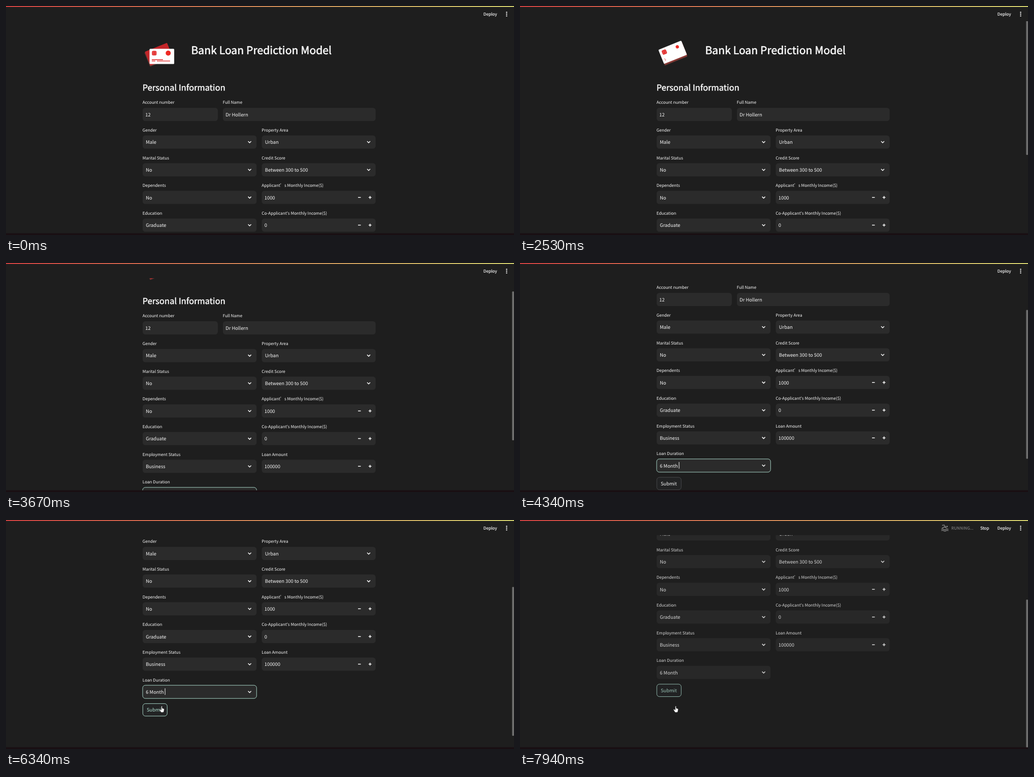
These frames come from a looping animation (1000 px wide and 452 px high, 8 s). An HTML page:

```html
<!DOCTYPE html>
<html lang="en">
<head>
<meta charset="utf-8">
<title>Loan form</title>
<style>
html, body { margin: 0; width: 100%; height: 100%; overflow: hidden; background: #1e1e1e; }
svg { display: block; width: 1000px; height: 452px; }
text {
  font-family: "Noto Sans CJK SC", "Noto Sans CJK JP", "Noto Sans CJK", "Open Sans", sans-serif;
  fill: #fafafa; text-rendering: geometricPrecision; white-space: pre;
}
.label { font-size: 8.18px; }
.value { font-size: 9.34px; }
.h2 { font-size: 21px; letter-spacing: .005em; stroke: #fafafa; stroke-width: .6px; }
.h3 { font-size: 16.35px; letter-spacing: .006em; stroke: #fafafa; stroke-width: .48px; }
.bar { font-size: 8.18px; stroke: #fafafa; stroke-width: .15px; }
.muted { font-size: 8.18px; fill: #8b8b8b; }
.icon { fill: none; stroke: #fafafa; stroke-width: 1.5; }
</style>
</head>
<body>
<svg viewBox="0 0 1000 452">
  <defs>
    <linearGradient id="glow">
      <stop offset="0" stop-color="#ff4b4b"/>
      <stop offset="1" stop-color="#fffd80"/>
    </linearGradient>
  </defs>
  <rect width="1000" height="452" fill="#1e1e1e"/>
  <g id="page">
    <g id="back">
      <rect x="-24.5" y="-14.5" width="48" height="30" rx="1.5" fill="#6e3733"/>
      <rect id="backFace" x="-23" y="-15.5" width="47" height="29.5" rx="1.5"/>
    </g>
    <g id="front">
      <rect x="-24.3" y="-15" width="48.6" height="30" rx="1.5" fill="#fff"/>
      <rect x="-19.5" y="-11" width="9" height="9" rx="2.5" fill="#e02424"/>
      <path d="M-19.5 -8h3m3 0h3M-19.5 -5h3m3 0h3M-16.5 -11v9M-13.5 -11v9" stroke="#f58a86" stroke-width=".6" fill="none"/>
      <circle id="mark" cx="12.5" cy="-6.5" fill="#ee2a24"/>
      <g id="lines" fill="#e02424">
        <rect y="5.6" width="22" height="1.5"/>
        <rect y="8.4" width="7" height="1.3"/>
        <rect x="10" y="8.4" width="26" height="1.3"/>
      </g>
    </g>
    <text class="h2" x="364.4" y="95">Bank Loan Prediction Model</text>
    <text class="h3" x="268.8" y="167">Personal Information</text>
    <g id="form"></g>
    <rect id="button" x="269.3" y="565" width="48" height="24.6" rx="5.2" fill="#222324" stroke-width=".9"/>
    <text id="submit" class="value" x="277" y="581">Submit</text>
    <rect id="caret" x="312.6" y="534.8" width="1" height="13" fill="#fafafa"/>
  </g>
  <rect id="thumb" x="996.3" width="3.7" height="294" rx="1.5" fill="#6d6d6d"/>
  <rect width="1000" height="30" fill="#1e1e1e"/>
  <rect width="1000" height="1.6" fill="url(#glow)"/>
  <g id="running">
    <g fill="none" stroke="#8b8b8b" stroke-width="1.3">
      <path d="M831 10.5l4-.6 3.2 4.2M830.5 16.2l5-2.6 4.2 2.4"/>
      <path d="M829.5 18.6q2.3-1.8 4.6 0t4.6 0 4.6 0M829.5 21.3q2.3-1.8 4.6 0t4.6 0 4.6 0"/>
      <circle cx="840.6" cy="13" r="1.4" fill="#8b8b8b" stroke="none"/>
    </g>
    <text class="muted" x="849" y="18.8">RUNNING...</text>
    <text class="bar" x="906" y="18.8">Stop</text>
  </g>
  <text class="bar" x="939.8" y="18.8">Deploy</text>
  <g fill="#fafafa">
    <circle cx="985.5" cy="12.4" r="1.2"/>
    <circle cx="985.5" cy="16" r="1.2"/>
    <circle cx="985.5" cy="19.6" r="1.2"/>
  </g>
  <rect y="448.6" width="1000" height="3.4" fill="#190f13"/>
  <path id="arrow" d="M0 0v8.6l2-1.8 1.4 3 1.4-.7-1.4-2.9h2.6z" fill="#fff" stroke="#111" stroke-width=".5"/>
  <path id="hand" d="M-.9 .6q.9-1.2 1.8 0v3.6l3.2 .9q.9 .4 .8 1.5l-.7 4.2q-.3 1.6-1.8 1.6h-2.6q-1 0-1.6-1l-2.4-4q-.3-1.3 1-1.1l2.3 1.5z" fill="#fff" stroke="#111" stroke-width=".5"/>
</svg>
<script>
const LOOP = 8000, ROW = 54.65, MINT = '#b4e6d6';
const $ = id => document.getElementById(id);
const el = (name, attrs, text = '') => {
  const node = document.createElementNS('http://www.w3.org/2000/svg', name);
  for (const key in attrs) node.setAttribute(key, attrs[key]);
  node.textContent = text;
  $('form').append(node);
  return node;
};

// row, left, width, kind, label, value
const fields = [
  [0, 269, 148, 'text', 'Account number', '12'],
  [0, 427, 300.6, 'text', 'Full Name', 'Dr Hollern'],
  [1, 269, 224.3, 'select', 'Gender', 'Male'],
  [1, 503.5, 224.1, 'select', 'Property Area', 'Urban'],
  [2, 269, 224.3, 'select', 'Marital Status', 'No'],
  [2, 503.5, 224.1, 'select', 'Credit Score', 'Between 300 to 500'],
  [3, 269, 224.3, 'select', 'Dependents', 'No'],
  [3, 503.5, 224.1, 'number', 'Applicant\u2019s Monthly Income($)', '1000'],
  [4, 269, 224.3, 'select', 'Education', 'Graduate'],
  [4, 503.5, 224.1, 'number', 'Co-Applicant\'s Monthly Income($)', '0'],
  [5, 269, 224.3, 'select', 'Employment Status', 'Business'],
  [5, 503.5, 224.1, 'number', 'Loan Amount', '100000'],
  [6, 269, 224.3, 'select', 'Loan Duration', '6 Month']
];

let lastBox;
for (const [row, x, width, kind, label, value] of fields) {
  const y = row * ROW, mid = 213.9 + y;
  el('text', { class: 'label', x: x - .2, y: 193.3 + y }, label);
  lastBox = el('rect', { x, y: 200.9 + y, width, height: 26, rx: 5.2, fill: '#2b2b2b', 'stroke-width': .9 });
  el('text', { class: 'value', x: x + (kind === 'select' ? 6.3 : 5.3), y: 217.6 + y }, value);
  const right = x + width;
  if (kind === 'select') {
    el('path', { class: 'icon', d: `M${right - 16.7} ${mid - 1.5}l3 3 3-3` });
  } else if (kind === 'number') {
    el('path', { class: 'icon', d: `M${right - 34.6} ${mid}h5.4M${right - 13.8} ${mid}h5.6m-2.8-2.8v5.6` });
  }
}

const smooth = p => p * p * (3 - 2 * p);
// Eased value from rows of [time, value, ...]
const track = (rows, t, col = 1) => {
  const i = rows.findIndex(r => r[0] > t);
  if (i === 0) return rows[0][col];
  if (i < 0) return rows[rows.length - 1][col];
  const a = rows[i - 1], b = rows[i];
  return a[col] + (b[col] - a[col]) * smooth((t - a[0]) / (b[0] - a[0]));
};

const scroll = [[2730, 0], [3670, 85.9], [3980, 85.9], [4340, 142], [4670, 142], [5070, 202.6], [7420, 202.6], [7900, 241]];
const flip = [[1830, 0], [2430, 1], [2640, 1], [3300, 0]];
const mouse = [[100, 12, 330], [890, 600, 150], [1130, 622.5, 126.5], [1270, 622.5, 126.5], [1600, 1004, 439],
  [5200, 1004, 180], [6010, 306, 366], [6340, 306.5, 367.3]];

const place = (id, x, y, turn = 0) => $(id).setAttribute('transform', `translate(${x} ${y}) rotate(${turn})`);
const show = (id, on) => $(id).setAttribute('visibility', on ? 'visible' : 'hidden');

function draw(t) {
  const top = track(scroll, t);
  const focus = t < 6860, over = t >= 5960, busy = t >= 7040;
  place('page', 0, -top);
  $('page').setAttribute('opacity', track([[7040, 1], [7900, .84]], t));
  $('thumb').setAttribute('y', top * .651);
  show('thumb', t >= 300);

  const p = track(flip, t);
  place('back', 300.5 + p * 1.5, 96 - p * 2, -22);
  $('backFace').setAttribute('fill', p > .5 ? '#8d3834' : '#c22529');
  place('front', 306.8 - p * 6.3, 99.5 - p * 8.2, -22 * p);
  $('mark').setAttribute('r', 5 - p * 1.8);
  $('lines').setAttribute('transform', `translate(-19.8 0) scale(${1 - p * .95} 1)`);

  lastBox.setAttribute('stroke', focus ? MINT : 'none');
  show('caret', focus && ((t - 6340) % 1060 + 1060) % 1060 < 530);
  $('button').setAttribute('stroke', over ? MINT : '#4b4c4e');
  $('submit').style.fill = over ? MINT : '#fafafa';
  show('running', busy);

  const x = track(mouse, t, 1), y = track(mouse, t, 2);
  place('arrow', x, y);
  place('hand', x, y);
  show('arrow', (t > 100 && t < 1600) || (t > 5200 && !over));
  show('hand', over);
}

const start = performance.now();
const tick = () => {
  draw((performance.now() - start) % LOOP);
  requestAnimationFrame(tick);
};
tick();
</script>
</body>
</html>
```
